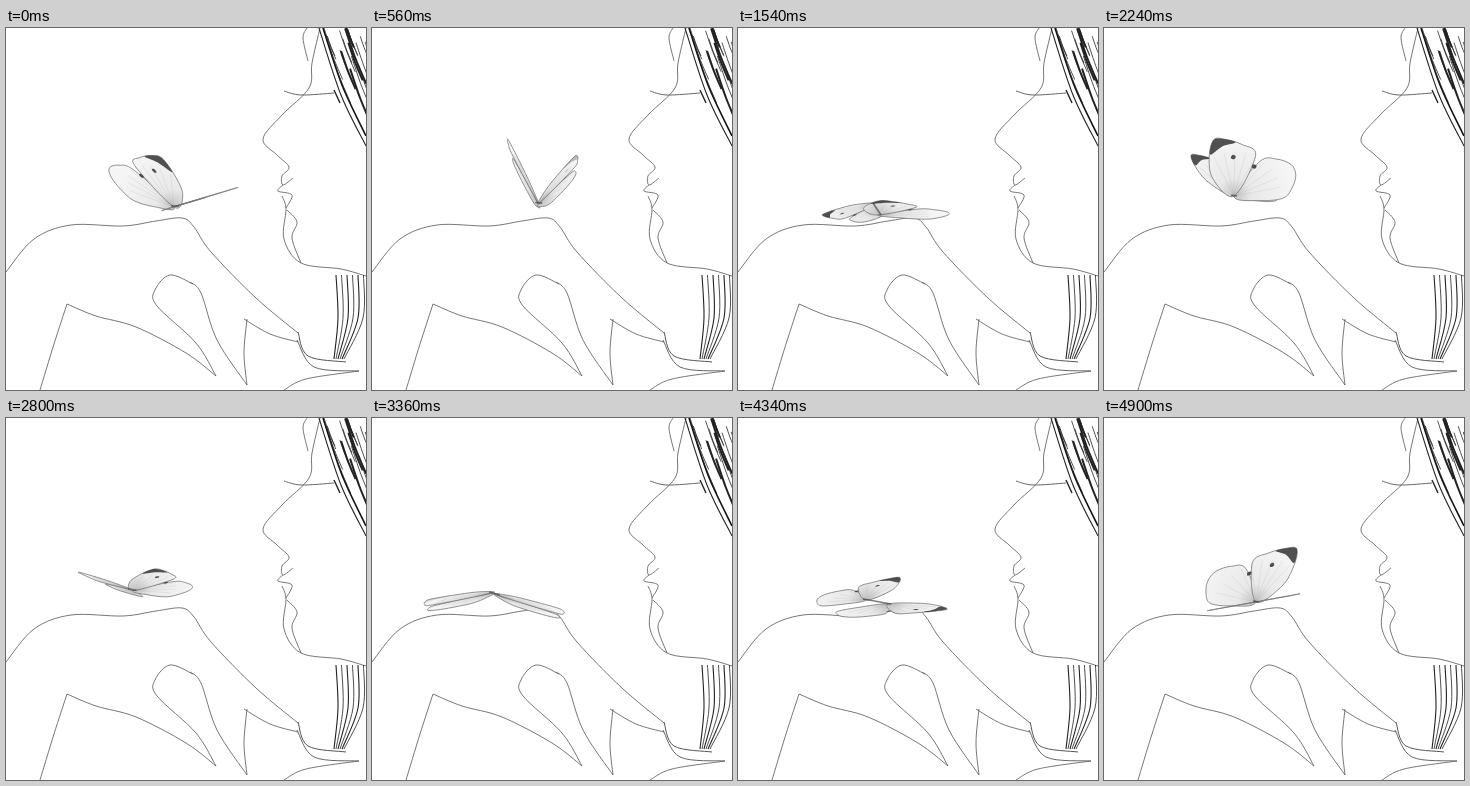
Recreate the animation shown at these times as an HTML page with a canvas. Size 360 px wide and 362 px high, loop 5.04 s.

```html
<!DOCTYPE html>
<html>
<head>
<meta charset="utf-8">
<style>
html, body { margin: 0; width: 100%; height: 100%; overflow: hidden; background: #fff; }
canvas { display: block; }
</style>
</head>
<body>
<canvas id="stage" width="360" height="362"></canvas>
<script>
const ctx = document.getElementById('stage').getContext('2d');
const STEP = 140, STEPS = 36;

// Smooth path through a flat list of x, y values
function curve(list, closed) {
  const n = list.length / 2, path = new Path2D();
  const at = i => {
    i = closed ? (i + n) % n : Math.max(0, Math.min(n - 1, i));
    return [list[2 * i], list[2 * i + 1]];
  };
  path.moveTo(...at(0));
  for (let i = 0; i < (closed ? n : n - 1); i++) {
    const [a, b, c, d] = [at(i - 1), at(i), at(i + 1), at(i + 2)];
    path.bezierCurveTo(b[0] + (c[0] - a[0]) / 6, b[1] + (c[1] - a[1]) / 6,
      c[0] - (d[0] - b[0]) / 6, c[1] - (d[1] - b[1]) / 6, c[0], c[1]);
  }
  return path;
}

function line(list, width = 0.8, color = '#555') {
  ctx.lineWidth = width;
  ctx.strokeStyle = color;
  ctx.stroke(curve(list));
}

function drawHand() {
  line([0, 244, 28, 211, 65, 197, 117, 198, 150, 193, 176, 190, 188, 199, 205, 224, 250, 270, 292, 305]);
  line([34, 362, 48, 316, 61, 276]);
  line([61, 276, 90, 288, 130, 299, 180, 325, 210, 348]);
  line([210, 348, 190, 315, 151, 278, 149, 262, 164, 247, 187, 256]);
  line([184, 254, 195, 265, 211, 312, 241, 357]);
  line([241, 357, 238, 325, 241, 291]);
  line([238, 291, 264, 306, 292, 314]);
}

function drawFace() {
  line([314, 0, 306, 35, 303, 60, 276, 87, 257, 111, 271, 127, 283, 139, 276, 148, 277, 157, 287, 150]);
  line([277, 157, 272, 163, 286, 167, 280, 180]);
  line([276, 168, 280, 181, 278, 211, 295, 235, 335, 241, 360, 248]);
  line([281, 182, 291, 194, 286, 210, 295, 235]);
  line([278, 63, 295, 67, 328, 65], 0.9);
  line([328, 62, 334, 75], 1.4, '#222');
  line([301, 0, 297, 10, 302, 33]);
}

function drawNeck() {
  line([292, 304, 302, 328, 340, 334], 1);
  line([291, 312, 308, 339, 353, 343], 0.9);
  line([278, 362, 300, 351, 353, 343]);
  for (let i = 0; i < 6; i++) {
    const x = 330 + 5.5 * i;
    line([x, 247, x + 2 - i / 2, 290, 328 + 2 * i, 331], i % 2 ? 0.8 : 1.1, '#222');
  }
}

function drawHair() {
  let seed = 11;
  const random = () => (seed = seed * 16807 % 2147483647) / 2147483647;
  line([313, 0, 335, 67, 360, 118], 1.1, '#222');
  line([317, 0, 336, 57, 360, 108], 1.6, '#111');
  for (let i = 0; i < 26; i++) {
    const y = 70 * random() * random(), length = 18 + 42 * random();
    const x = 316 + 44 * random() + y * 0.38;
    line([x, y, x + length * 0.17, y + length / 2, x + length * 0.38, y + length],
      random() < 0.4 ? 2 : 0.8, '#222');
  }
}

// Flat wing: the front tip is (1, 0), the rear lobe is (0, 1)
const FORE = [0, 0, .39, -.22, .76, -.16, 1.02, 0, .97, .17, .79, .4, .54, .54];
const HIND = [0, 0, .42, .57, .37, .83, .2, 1.02, 0, 1.03, -.19, .9, -.3, .72, -.22, .38];
const TIP = [.8, -.13, 1.02, 0, .97, .17, .86, .31, .87, .1];

// step, then for each wing: root, front vector, rear vector
const POSES = [
  [0, 168, 179, -12, -48, -61, -29, 170, 178, 60, -18, 5, -1],
  [7, 165, 173, -41, -71, 14, -24, 165, 173, 15, -66, 46, -30],
  [11, 138, 176, -52, 10, -5, 16, 140, 187, 2, -14, 68, 0],
  [16, 130, 168, -42, -40, 40, -10, 130, 168, -20, -55, 60, -20],
  [24, 120, 175, -60, 6, -50, 16, 125, 177, 60, 13, 48, 20],
  [28, 135, 180, -8, -52, -52, -18, 136, 180, 32, -46, -22, -28],
  [31, 128, 182, 33, -22, -47, -1, 150, 186, 58, 5, -45, 12],
  [35, 152, 184, 40, -52, -47, -20, 152, 184, 43, -8, -45, 8]
];

function poseAt(step) {
  const i = POSES.findLastIndex(p => p[0] <= step);
  const from = POSES[i], to = POSES[(i + 1) % POSES.length];
  const k = (step - from[0]) / ((to[0] || STEPS) - from[0]);
  return from.map((v, j) => v + (to[j] - v) * k).slice(1);
}

function drawWing([x, y, fx, fy, hx, hy]) {
  const place = (a, b) => [x + a * fx + b * hx, y + a * fy + b * hy];
  const shape = list => curve(list.map((v, i) => i % 2 ? place(list[i - 1], v)[1] : place(v, list[i + 1])[0]), true);
  const shade = ctx.createRadialGradient(x, y, 0, x, y, 60);
  shade.addColorStop(0, '#c4c4c4');
  shade.addColorStop(.3, '#e9e9e9');
  shade.addColorStop(1, '#f5f5f5');
  for (const part of [HIND, FORE]) {
    const path = shape(part);
    ctx.fillStyle = shade;
    ctx.fill(path);
    ctx.lineWidth = 0.8;
    ctx.strokeStyle = '#777';
    ctx.stroke(path);
  }
  for (let i = 0; i < 9; i++) {
    const angle = i * .23 - .12;
    line([x, y, ...place(.75 * Math.cos(angle), .75 * Math.sin(angle))], 0.5, 'rgba(120,120,120,.22)');
  }
  // Dark marks fade when the wing is seen nearly edge-on
  const area = Math.abs(fx * hy - fy * hx);
  const dark = Math.max(0, Math.min(.85, (area - 640) / 160));
  ctx.fillStyle = `rgba(50,50,50,${dark})`;
  ctx.fill(shape(TIP));
  for (const [a, b] of [[.635, .2], [.37, .46]]) {
    ctx.fill(shape([a - .04, b, a, b - .04, a + .04, b, a, b + .04]));
  }
}

function draw(now) {
  const pose = poseAt(Math.floor(now / STEP) % STEPS);
  const left = pose.slice(0, 6), right = pose.slice(6);
  ctx.fillStyle = '#fff';
  ctx.fillRect(0, 0, 360, 362);
  drawHand();
  drawFace();
  drawNeck();
  drawHair();
  drawWing(left);
  drawWing(right);
  line([left[0] - 3, left[1] - 1, right[0] + 3, right[1]], 1.6, 'rgba(70,70,70,.7)');
}

const start = performance.now();
function tick() {
  draw(performance.now() - start);
  requestAnimationFrame(tick);
}
tick();
</script>
</body>
</html>
```
